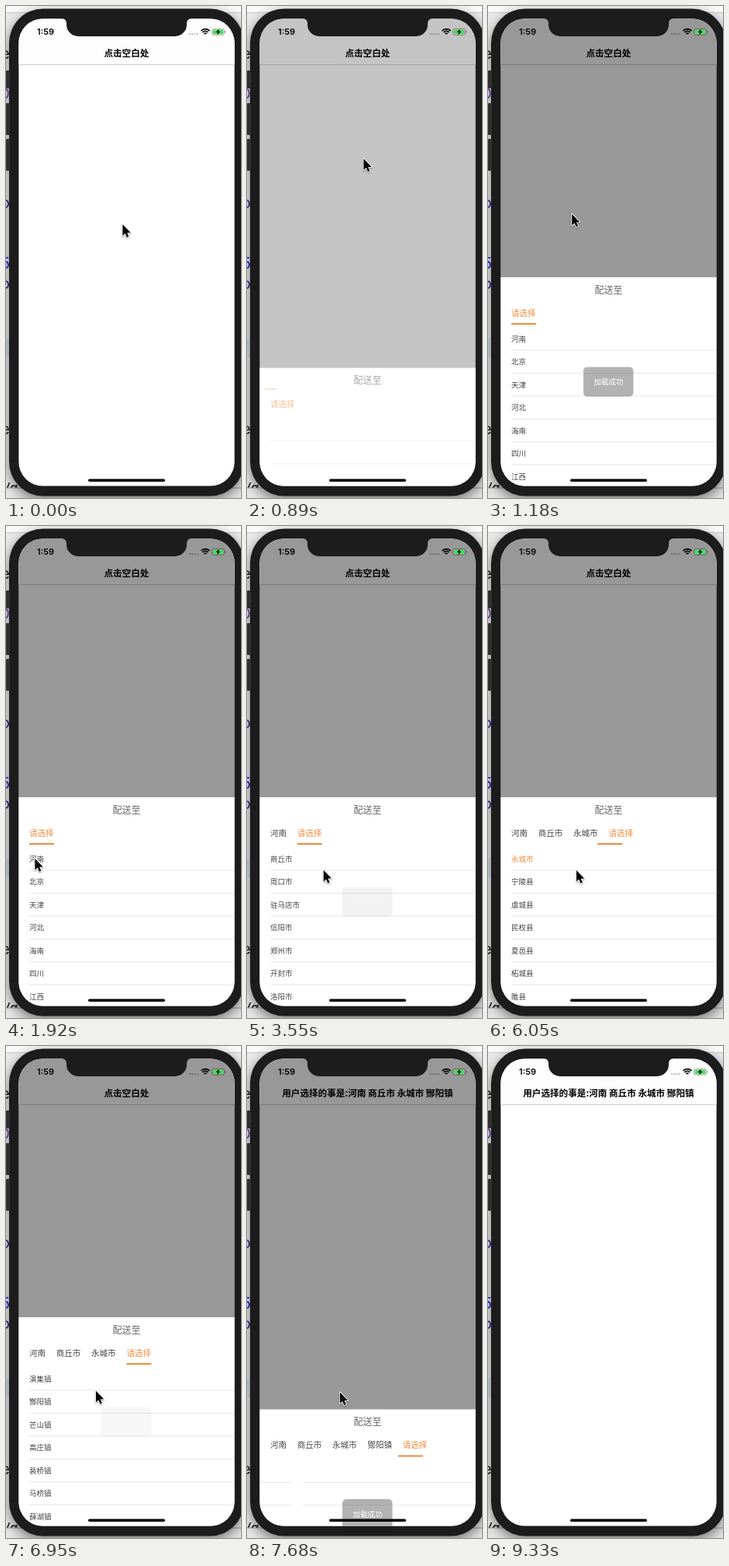
An HTML page with a canvas that plays this animation: 303 px wide and 633 px high, repeating every 9.63 s.

```html
<!DOCTYPE html>
<html lang="zh-CN">
<head>
<meta charset="utf-8">
<style>
  html, body { margin: 0; width: 100%; height: 100%; overflow: hidden; background: #ececec; }
  canvas { display: block; width: 303px; height: 633px; }
</style>
</head>
<body>
<canvas id="stage"></canvas>
<script>
const W = 303, H = 633, LOOP = 9630, STEP = 148, LEAD = 20;
const CJK = '"Noto Sans CJK SC", "Noto Sans CJK", sans-serif';
const LATIN = 'Inter, "Liberation Sans", sans-serif';
const ORANGE = '#f08a3a', INK = '#444', CASE = '#1c1c1c';
const SCREEN = { x: 16.4, y: 16.5, w: 278.2, h: 601 };
const MID = 155.4, SHEET_TOP = 349, SHEET_H = 268;
const TAB_SIZE = 10.5, ROW_H = 29.5, SLIDE = 270;

const canvas = document.getElementById('stage');
const ctx = canvas.getContext('2d');
const dpr = window.devicePixelRatio || 1;
canvas.width = W * dpr;
canvas.height = H * dpr;

const PAGES = [
  '河南 北京 天津 河北 海南 四川 江西',
  '商丘市 周口市 驻马店市 信阳市 郑州市 开封市 洛阳市',
  '永城市 宁陵县 虞城县 民权县 夏邑县 柘城县 睢县',
  '演集镇 酂阳镇 芒山镇 高庄镇 裴桥镇 马桥镇 薛湖镇',
  ''
].map(s => s.split(' '));
const PICKED = ['河南', '商丘市', '永城市', '酂阳镇'];

// Page i arrives at LOAD[i]; a row on it is chosen at TAP[i].
const LOAD = [950, 2720, 4480, 6100, 7500];
const TAP = [2330, 4395, 5886, 7472];
const OPEN = 728, CLOSE = 7562, GONE = 7840, RETITLE = 7540;

// Pointer moves: start time, end time, destination.
const HOME = [150.4, 281];
const MOVES = [
  [296, 740, 150.4, 196.5], [1036, 1480, 24, 410], [1480, 1924, 37.4, 428],
  [2664, 3108, 97.4, 444], [3404, 4144, 104, 438], [5032, 5920, 114, 443],
  [6660, 7548, 119.8, 445.5], [9028, 9176, 137, 460]
];
const POINTER_END = 9324;

const clamp = v => Math.max(0, Math.min(1, v));
const mix = (a, b, p) => a + (b - a) * p;
const linear = (t, start, dur) => clamp((t - start) / dur);
function ease(t, start, dur) {
  const p = linear(t, start, dur);
  return p < .5 ? 2 * p * p : 1 - 2 * (1 - p) * (1 - p);
}

function text(str, x, y, size, color, opt = {}) {
  ctx.font = `${opt.style || ''} ${opt.weight || 400} ${size}px ${opt.font || CJK}`;
  ctx.textAlign = opt.align || 'left';
  ctx.fillStyle = color;
  ctx.fillText(str, x, y + size * .38);
}

function rect(x, y, w, h, color) {
  ctx.fillStyle = color;
  ctx.fillRect(x, y, w, h);
}

function round(x, y, w, h, r, color) {
  ctx.beginPath();
  ctx.roundRect(x, y, w, h, r);
  ctx.fillStyle = color;
  ctx.fill();
}

function polygon(points) {
  ctx.beginPath();
  points.forEach(p => ctx.lineTo(...p));
  ctx.closePath();
}

function drawDesk() {
  const side = { font: LATIN, align: 'right' };
  rect(0, 0, W, H, '#ebebeb');
  rect(0, 0, W, 8, '#fafafa');
  rect(0, 8, W, 1, '#c9c9c9');
  rect(0, 427, 8, 25, '#d5e0ea');
  for (const y of [60, 543]) text('e', 5, y, 20, '#222', side);
  for (const y of [252, 356]) text('o', 5, y, 20, '#40209a', side);
  text('D', 5, 112, 20, '#7a3fb5', side);
  text('5', 5, 330, 20, '#2222dd', side);
  text('/a', 15, 620, 17, '#222', { ...side, weight: 600, style: 'italic' });
  rect(0, 620, W, H - 620, '#e6e6e6');
  rect(0, 619.5, W, 1, '#999');
}

function drawBody() {
  ctx.save();
  ctx.shadowColor = 'rgba(0,0,0,.5)';
  ctx.shadowBlur = 16 * dpr;
  ctx.shadowOffsetY = 5 * dpr;
  round(4, 3.5, 303, 627, 44, CASE);
  ctx.restore();
  round(0, 83, 5, 23, 1, '#303030');
  for (const y of [125, 171]) round(0, y, 5, 41, 1, '#303030');
}

function drawNotch() {
  const left = 78, right = 233, top = 16, bottom = 39;
  ctx.beginPath();
  ctx.moveTo(left - 6, top);
  ctx.arcTo(left, top, left, bottom, 6);
  ctx.arcTo(left, bottom, right, bottom, 15);
  ctx.arcTo(right, bottom, right, top, 15);
  ctx.arcTo(right, top, right + 6, top, 6);
  ctx.closePath();
  ctx.fillStyle = CASE;
  ctx.fill();
}

function drawStatus() {
  const faint = 'rgba(0,0,0,.4)';
  text('1:59', 51, 33.2, 11, '#000', { font: LATIN, weight: 600, align: 'center' });
  for (let i = 0; i < 4; i++) round(235.8 + i * 3.3, 35, 2.3, 2.3, 1.1, 'rgba(0,0,0,.25)');

  ctx.strokeStyle = '#000';
  ctx.lineWidth = 1.7;
  for (let r = 2; r < 8; r += 2.8) {
    ctx.beginPath();
    ctx.arc(257, 37.2, r, -Math.PI * .76, -Math.PI * .24);
    ctx.stroke();
  }

  ctx.beginPath();
  ctx.roundRect(265.5, 29.3, 16, 8, 2.3);
  ctx.lineWidth = .8;
  ctx.strokeStyle = faint;
  ctx.stroke();
  round(266.6, 30.4, 13.8, 5.8, 1.3, '#4cd964');
  round(282.3, 32, 1, 2.8, .5, faint);
  polygon([[274.6, 29.4], [270.6, 33.8], [273, 33.8], [272.2, 37.4], [276.4, 32.8], [274, 32.8]]);
  ctx.fillStyle = '#000';
  ctx.fill();
}

function drawNav(t) {
  const title = t < RETITLE ? '点击空白处' : '用户选择的事是:' + PICKED.join(' ');
  rect(16, 16, 279, 59, '#fdfdfd');
  rect(16, 75, 279, 1, '#cfcfcf');
  text(title, MID, 60.5, 11.6, '#000', { weight: 600, align: 'center' });
}

function drawTabs(t) {
  const count = TAP.filter(at => t >= at).length;
  let x = 30, prev = x;
  for (const name of PICKED.slice(0, count)) {
    text(name, x, 46, TAB_SIZE, INK);
    prev = x;
    x += name.length * TAB_SIZE + 13.8;
  }
  text('请选择', x, 46, TAB_SIZE, ORANGE);

  const grow = ease(t, 745, 300);
  const bar = count ? mix(prev, x, ease(t, TAP[count - 1], 300)) : mix(SCREEN.x, x, grow);
  rect(bar, 59 * grow, 32 * grow, 2 * grow, ORANGE);
}

function drawPages(t) {
  const w = SCREEN.w;
  const scroll = LOAD.slice(1).reduce((sum, at) => sum + ease(t, at, SLIDE), 0);
  PAGES.forEach((rows, i) => {
    if (Math.abs(i - scroll) >= 1) return;
    const x = SCREEN.x + (i - scroll) * w;
    for (let r = 0; r < 7; r++) {
      rect(x + 13.8, 93.4 + r * ROW_H, w - 13.8, .8, '#e2e2e2');
      if (!rows[r] || t < LOAD[i]) continue;
      const chosen = rows[r] === PICKED[i] && t >= TAP[i];
      text(rows[r], x + 13.6, 79 + r * ROW_H, 9.5, chosen ? ORANGE : INK);
    }
  });
}

function drawToast(t) {
  for (const at of LOAD) {
    const alpha = 1 - ease(t, at + 560, 383);
    if (t < at + 190 || alpha <= 0) continue;
    ctx.globalAlpha = alpha;
    round(123, 115.5, 64.5, 38, 5, 'rgba(0,0,0,.3)');
    text('加载成功', MID, 134.5, 9.5, '#fff', { align: 'center' });
    ctx.globalAlpha = 1;
  }
}

function drawSheet(t) {
  if (t < OPEN || t >= GONE) return;
  const up = ease(t, OPEN, 300), down = ease(t, CLOSE, 285);
  rect(16, 16, 279, 602, `rgba(0,0,0,${.4 * up})`);
  ctx.save();
  ctx.translate(0, SHEET_TOP + SHEET_H * (1 - up + down));
  rect(16, 0, 279, 290, '#fff');
  ctx.globalAlpha = up;
  text('配送至', MID, 16, 12, '#666', { align: 'center' });
  drawPages(t);
  drawTabs(t);
  ctx.globalAlpha = 1;
  drawToast(t);
  ctx.restore();
}

function drawPointer(t) {
  if (t >= POINTER_END) return;
  let [x, y] = HOME;
  for (const [start, end, toX, toY] of MOVES) {
    const p = linear(t, start, end - start);
    x = mix(x, toX, p);
    y = mix(y, toY, p);
  }
  ctx.save();
  ctx.translate(x, y);
  polygon([[0, 0], [0, 14.6], [3.3, 11.6], [5.5, 16.7], [7.9, 15.6], [5.7, 10.7], [10.2, 10.5]]);
  ctx.shadowColor = 'rgba(0,0,0,.4)';
  ctx.shadowBlur = 2 * dpr;
  ctx.shadowOffsetY = dpr;
  ctx.lineWidth = 1.8;
  ctx.lineJoin = 'round';
  ctx.strokeStyle = '#fff';
  ctx.stroke();
  ctx.shadowColor = 'transparent';
  ctx.fillStyle = '#000';
  ctx.fill();
  ctx.restore();
}

function draw(t) {
  ctx.setTransform(dpr, 0, 0, dpr, 0, 0);
  drawDesk();
  drawBody();
  ctx.save();
  ctx.beginPath();
  ctx.roundRect(SCREEN.x, SCREEN.y, SCREEN.w, SCREEN.h, 31);
  ctx.clip();
  rect(16, 16, 279, 602, '#fff');
  drawNav(t);
  drawSheet(t);
  drawStatus();
  round(106, 608.6, 99, 3.4, 1.7, '#000');
  ctx.restore();
  drawNotch();
  drawPointer(t);
}

const begin = performance.now();
function tick() {
  const t = (performance.now() - begin) % LOOP;
  draw(Math.floor((t + LEAD) / STEP) * STEP);
  requestAnimationFrame(tick);
}
tick();
</script>
</body>
</html>
```
